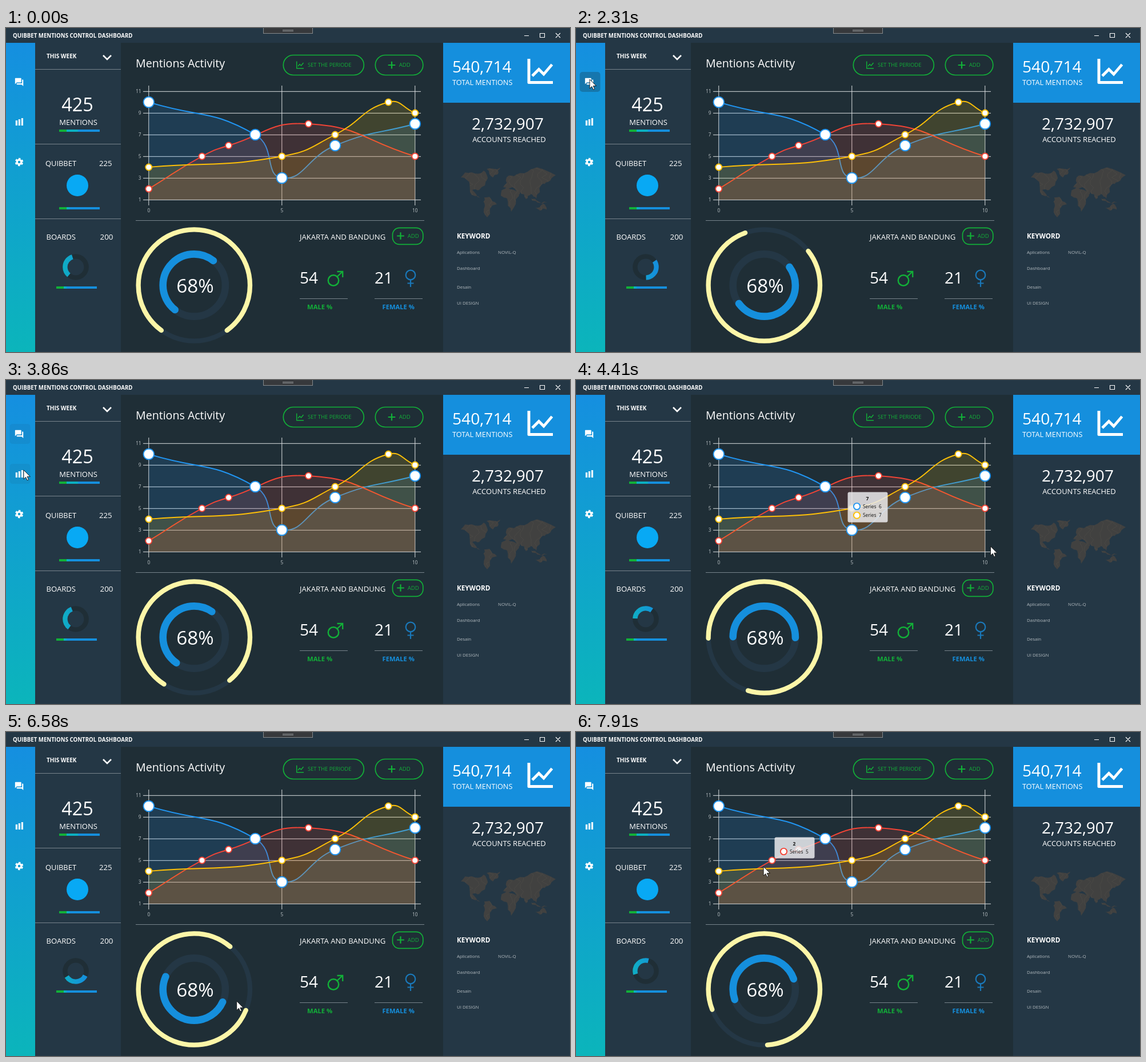
An HTML page that plays this animation: 987x568 px, repeating every 7990 ms.

```html
<!DOCTYPE html>
<html lang="en">
<head>
<meta charset="utf-8">
<title>Mentions dashboard</title>
<style>
  html, body { margin: 0; width: 100%; height: 100%; overflow: hidden; background: #1f2e36; }
  svg { display: block; width: 100%; height: 100%; }
  text { font-family: "Open Sans", "Noto Sans", sans-serif; }
</style>
</head>
<body>
<svg id="stage" viewBox="0 0 987 568" fill="none"></svg>
<script>
const LOOP = 7990;
const PANEL = '#243745', DARK = '#1f2e36', BLUE = '#158fdd', GREEN = '#12b038', TEAL = '#0bb0c0', RULE = '#77838b';

// --- markup helpers ---
const rect = (x, y, w, h, fill, more = '') =>
  `<rect x="${x}" y="${y}" width="${w}" height="${h}" fill="${fill}" ${more}/>`;
const circle = (x, y, r, more = '') => `<circle cx="${x}" cy="${y}" r="${r}" ${more}/>`;
const line = (d, color, width = 1, more = '') =>
  `<path d="${d}" stroke="${color}" stroke-width="${width}" ${more}/>`;
const shape = (d, fill, more = '') => `<path d="${d}" fill="${fill}" ${more}/>`;
const text = (x, y, size, str, fill = '#fff', more = '') =>
  `<text x="${x}" y="${y}" font-size="${size}" fill="${fill}" ${more}>${str}</text>`;
const BOLD = ' font-weight="700"', MID = ' text-anchor="middle"', END = ' text-anchor="end"';

// --- chart ---
const px = v => 249.8 + v * 46.6;
const py = v => 320 - v * 19;

const series = [
  { color: '#2196f3', r: 9.3, data: [[0, 10], [4, 7], [5, 3], [7, 6], [10, 8]] },
  { color: '#f34436', r: 5.5, data: [[0, 2], [2, 5], [3, 6], [6, 8], [10, 5]] },
  { color: '#fec007', r: 5.5, data: [[0, 4], [5, 5], [7, 7], [9, 10], [10, 9]] }
];

// Smoothed line: control points follow the neighbours, weighted by segment length.
function smoothPath(pts) {
  const mid = (a, b) => [(a[0] + b[0]) / 2, (a[1] + b[1]) / 2];
  const len = (a, b) => Math.hypot(b[0] - a[0], b[1] - a[1]);
  let d = 'M' + pts[0];
  for (let i = 0; i < pts.length - 1; i++) {
    const p1 = pts[i], p2 = pts[i + 1], p0 = pts[i - 1] || p1, p3 = pts[i + 2] || p2;
    const c1 = mid(p0, p1), c2 = mid(p1, p2), c3 = mid(p2, p3), l2 = len(p1, p2);
    const k1 = len(p0, p1) / (len(p0, p1) + l2), k2 = l2 / (l2 + len(p2, p3));
    const ctrl = (p, from, to, k) => p.map((v, j) => v + c2[j] - from[j] - (to[j] - from[j]) * k);
    d += `C${ctrl(p1, c1, c2, k1)} ${ctrl(p2, c2, c3, k2)} ${p2}`;
  }
  return d;
}

function chart() {
  let grid = '', curves = '', dots = '';
  for (let v = 1; v <= 11; v += 2) {
    grid += line(`M240 ${py(v) + .3}H726`, '#dde1e3') + text(236.5, py(v) + 3.2, 8.2, v, '#c3cacd', END);
  }
  for (let v = 0; v <= 10; v += 5) {
    grid += line(`M${px(v)} 101V311`, '#dde1e3') + text(px(v), 322.5, 8.2, v, '#c3cacd', MID);
  }
  for (const { color, r, data } of series) {
    const pts = data.map(([x, y]) => [px(x), py(y)]);
    const d = smoothPath(pts);
    curves += shape(`${d}V${py(1)}H${px(0)}Z`, color, 'fill-opacity=".15"') + line(d, color, 1.9);
    for (const [x, y] of pts) dots += circle(x, y, r, `fill="#fff" stroke="${color}" stroke-width="1.9"`);
  }
  return grid + curves + dots;
}

// --- world map: rough outlines with seeded coastlines ---
let seed = 7;
const random = () => (seed = seed * 16807 % 2147483647) / 2147483647;

function roughen(pts) {
  return pts.flatMap((a, i) => {
    const b = pts[(i + 1) % pts.length], k = (random() - .5) * .45;
    return [a, [(a[0] + b[0]) / 2 - (b[1] - a[1]) * k, (a[1] + b[1]) / 2 + (b[0] - a[0]) * k]];
  });
}

function worldMap() {
  const lands = [
    '796,262 815,253 836,250 843,264 828,284 816,284 830,298 812,288 806,266',
    '841,247 865,245 861,256 852,262',
    '837,297 846,296 859,309 842,332 838,312',
    '867,285 876,280 898,294 884,322 877,299 866,294',
    '870,279 876,262 893,257 918,248 962,258 948,270 937,275 928,299 919,291 910,300 899,287 895,295 886,279',
    '919,299 928,302 947,306 930,306',
    '926,315 940,308 946,318 934,320'
  ];
  const coast = lands.map(s => {
    const pts = s.split(' ').map(p => p.split(',').map(Number));
    return `M${roughen(roughen(pts)).join('L')}Z`;
  }).join('');
  let borders = '';
  for (let x = 804; x < 962; x += 12) {
    borders += `M${x} 244`;
    for (let y = 250; y < 334; y += 6) borders += `L${x + random() * 14} ${y}`;
  }
  return `<clipPath id="land"><path d="${coast}"/></clipPath>` +
    shape(coast, '#414140') + line(borders, '#504d49', .6, 'clip-path="url(#land)"');
}

// --- small parts ---
const split = (x, y, teal) => rect(x, y, 71, 4, BLUE) + rect(x, y, teal, 4, TEAL) + rect(x, y, 13, 4, GREEN);
const pill = (x, y, w, h, r) =>
  `<rect x="${x}" y="${y}" width="${w}" height="${h}" rx="${r}" stroke="${GREEN}" stroke-width="1.7"/>`;
const plus = (x, y, r) => line(`M${x - r} ${y}H${x + r}M${x} ${y - r}V${y + r}`, GREEN, 2.2);
const ring = (id, x, y, r, width, color, track, sweep, cap) =>
  circle(x, y, r, `stroke="${track}" stroke-width="${width}"`) +
  circle(x, y, r, `id="${id}" stroke="${color}" stroke-width="${width}" pathLength="360"
    stroke-dasharray="${sweep} ${360 - sweep}" stroke-linecap="${cap}"`);

const gear = circle(23, 235, 3.8, 'stroke="#fff" stroke-width="3.2"') +
  circle(23, 235, 6, 'stroke="#fff" stroke-width="2.4" stroke-dasharray="3.4 2.883" stroke-dashoffset="-1.44"');
const chat = shape('M17 12V3A1 1 0 0 0 16 2H3A1 1 0 0 0 2 3V17L6 13H16A1 1 0 0 0 17 12M21 6H19V15H6V17A1 1 0 0 0 7 18H18L22 22V7A1 1 0 0 0 21 6Z',
  '#fff', 'transform="translate(14.4 86.2) scale(.72)"');
const bars = [9, 11, 13].map((h, i) => rect(16.8 + i * 5, 171 - h, 3.2, h, '#fff')).join('');

const menu = [0, 1, 2].map(i => ({ id: 'menu' + i, x: 6.5, y: 77 + i * 70, w: 36, h: 35 }));
const addButton = { x: 676.5, y: 350.3, w: 53.3, h: 29 };

function tip(id, title, rows) {
  let s = rect(-.5, -.5, 70, 21 + rows.length * 16, '#ececee', 'rx="3" fill-opacity=".85"') +
    text(34, 14, 8.5, title, '#111', BOLD + MID);
  rows.forEach(([color, value], i) => {
    const y = 24.5 + i * 15.7;
    s += circle(15.5, y, 5.6, `fill="#fff" stroke="${color}" stroke-width="1.9"`) +
      text(26, y + 3.2, 8.4, 'Series', '#111') + text(54, y + 3.2, 8.4, value, '#111');
  });
  return `<g id="${id}">${s}</g>`;
}

// --- scene ---
const titleBar =
  rect(0, 0, 987, 26, PANEL) +
  text(12, 16.6, 9.7, 'QUIBBET MENTIONS CONTROL DASHBOARD', '#fff', BOLD) +
  rect(450.5, -1, 86, 10.5, '#37393c', 'stroke="#85898c"') +
  line('M484 3.5H503M484 5.5H503', '#8b8e90') +
  line('M907 13.5H915M935 9.5H942.5V16.5H934.5V9.5ZM962 9L970 17M970 9L962 17', '#fff', 1.1);

const sidebar =
  rect(0, 26, 51, 542, 'url(#side)') +
  menu.map(m => rect(m.x, m.y, m.w, m.h, '#1c3340', `id="${m.id}" rx="5"`)).join('') +
  chat + bars + gear;

const leftPanel =
  rect(51, 26, 150, 542, PANEL) +
  line('M51 72.5H201M51 203.5H201M51 334.5H201', RULE) +
  text(71, 53.4, 10, 'THIS WEEK', '#fff', BOLD) + line('M170 48L177 55 184 48', '#fff', 2.6) +
  text(125, 146, 32.5, '425', '#fff', MID) + text(126.5, 169.6, 13, 'MENTIONS', '#fff', MID) + split(93, 178, 33) +
  text(69, 241.5, 12.9, 'QUIBBET') + text(185.5, 241.5, 13.2, '225', '#fff', END) +
  circle(125, 276, 19, 'fill="#08a9f4"') + split(93, 314, 18) +
  text(70.5, 371, 13.1, 'BOARDS') + text(187.5, 371, 13.4, '200', '#fff', END) +
  ring('small', 122, 419, 18.6, 8.4, 'url(#arc)', DARK, 122, 'butt') + split(88, 453, 18);

const center =
  text(227, 69, 19.6, 'Mentions Activity') +
  pill(485.3, 47.5, 141, 35, 17.5) + pill(646.3, 47.5, 83.5, 35, 17.5) +
  pill(addButton.x, addButton.y, addButton.w, addButton.h, 12) +
  line('M508.7 58.5V70.7H521M511 67L514 63.5 516.5 66 520.5 61', GREEN, 1.5) +
  text(528, 68.4, 9.4, 'SET THE PERIODE', GREEN) +
  plus(675, 65, 6.3) + text(687.7, 68.4, 9.6, 'ADD', GREEN) +
  plus(690.5, 364.5, 6.3) + text(702.7, 368.2, 9.6, 'ADD', GREEN) +
  chart() +
  line('M227 337.5H732', RULE) +
  ring('outer', 329.3, 451, 97.7, 8.3, '#fdf6a8', PANEL, 288, 'round') +
  ring('inner', 329.3, 451, 54.6, 12.6, BLUE, PANEL, 180, 'round') +
  text(331, 464, 33.3, '68%', '#fff', MID) +
  text(514, 371, 13.1, 'JAKARTA AND BANDUNG') +
  text(514, 448, 28, '54') + text(645, 448, 28, '21') +
  circle(573, 442.5, 9.2, 'stroke="#12b038" stroke-width="2.5"') +
  line('M579.5 436L589 427M579.5 427H589.2V437', GREEN, 2.3) +
  circle(708, 433, 8.3, 'stroke="#1a78b9" stroke-width="2.2"') +
  line('M708 441V454M702.5 447.5H713.5', '#1a78b9', 2.2) +
  line('M514 474.5H598M645 474.5H729', RULE) +
  text(527, 493, 11.3, 'MALE %', GREEN, BOLD) + text(658.5, 493, 11.2, 'FEMALE %', BLUE, BOLD);

const keyword = (x, y, str) => text(x, y, 7.9, str, '#b4bcc1');

const rightPanel =
  rect(765, 26, 222, 542, PANEL) + rect(765, 26, 222, 105, BLUE) +
  text(781, 78.3, 28.2, '540,714') + text(781, 100.4, 12.7, 'TOTAL MENTIONS') +
  line('M915 54V95.5H957', '#fff', 5, 'stroke-linejoin="round"') +
  line('M921 84L932.5 72.5 941 81 955.5 64', '#fff', 4.8) +
  text(878, 178, 28, '2,732,907', '#fff', MID) + text(880.5, 199.7, 13, 'ACCOUNTS REACHED', '#fff', MID) +
  worldMap() +
  text(789, 369, 11.7, 'KEYWORD', '#fff', BOLD) +
  keyword(789, 396, 'Aplications') + keyword(861, 396, 'NOVIL-Q') + keyword(789, 424, 'Dashboard') +
  keyword(789, 457, 'Desain') + keyword(789, 485, 'UI DESIGN');

const overlay =
  circle(703.5, 361.5, 6.5, 'id="ripple" fill="#17232a"') +
  tip('tipSeven', 7, [[series[0].color, 6], [series[2].color, 7]]) +
  tip('tipTwo', 2, [[series[1].color, 5]]) +
  '<path id="cursor" d="M0 0V16L3.7 12.5 6.2 18 8.6 17 6.2 11.5H11.4Z" fill="#fff" stroke="#111" stroke-width=".9"/>';

const stage = document.getElementById('stage');
stage.innerHTML =
  `<defs>
    <linearGradient id="side" x1="0" y1="0" x2="0" y2="1"><stop stop-color="#158fe0"/><stop offset="1" stop-color="#0bb5bb"/></linearGradient>
    <linearGradient id="arc" gradientUnits="userSpaceOnUse" x1="99" y1="0" x2="140" y2="0"><stop stop-color="#0fafc3"/><stop offset="1" stop-color="#158fdd"/></linearGradient>
  </defs>` + rect(0, 0, 987, 568, DARK) + titleBar + sidebar + leftPanel + center + rightPanel + overlay;

// --- motion ---
const unit = v => Math.max(0, Math.min(1, v));

// The screen refreshes at a steady step, with two longer holds.
const STEP = 77.2;
const refreshTime = n => n * STEP + (n > 17 ? 152 : 0) + (n > 64 ? 102 : 0);

function lastRefresh(clock) {
  let n = 0;
  while (refreshTime(n + 1) <= clock + 10) n++;
  return refreshTime(n);
}

// The rings turn at constant speed but lose some time around each hold.
const lag = t => 428 * unit((t - 1310) / 1000) + 232 * unit((t - 4400) / 1000);
const spin = t => 216 + .104 * (t - lag(t));

// Pointer stops: [time, x, y]
const stops = [[190, 816, 550], [820, 366, 334], [1310, 18, 167], [1540, 18, 167], [2310, 24, 90], [2600, 24, 90],
  [2960, 26, 242], [3240, 26, 242], [3680, 24, 92], [4090, 40, 244], [4400, 730, 292], [5120, 704, 362],
  [6130, 704, 362], [6580, 404, 473], [7500, 338, 232], [7900, 328, 236]];

function pointer(t) {
  const i = Math.max(1, stops.findIndex(s => s[0] >= t));
  const [a, b] = t > stops[stops.length - 1][0] ? stops.slice(-2) : [stops[i - 1], stops[i]];
  const k = Math.min(1, (t - a[0]) / (b[0] - a[0]));
  return [a[1] + (b[1] - a[1]) * k, a[2] + (b[2] - a[2]) * k];
}

// Highlight fades with the share of recent time spent over a button.
function hover(t, { x, y, w, h }) {
  let hits = 0;
  for (let k = 0; k < 4; k++) {
    const [cx, cy] = pointer(t - k * 50);
    if (cx > x && cx < x + w && cy > y && cy < y + h) hits++;
  }
  return hits / 4;
}

const el = Object.fromEntries([...stage.querySelectorAll('[id]')].map(n => [n.id, n]));
const set = (id, name, value) => el[id].setAttribute(name, value);
const move = (id, x, y) => set(id, 'transform', `translate(${x.toFixed(1)} ${y.toFixed(1)})`);
const show = (id, on) => set(id, 'display', on ? 'inline' : 'none');
const turn = (id, angle) => set(id, 'stroke-dashoffset', (90 - angle % 360).toFixed(2));

function draw(now) {
  const t = lastRefresh(now % LOOP);
  const [cx, cy] = pointer(t);

  turn('outer', spin(t));
  turn('inner', spin(t) + 2);
  turn('small', spin(t) + 4);

  show('cursor', t > 150);
  move('cursor', cx, cy);

  for (const m of menu) set(m.id, 'opacity', .3 * hover(t, m));
  set('ripple', 'opacity', .95 * hover(t, addButton));

  const glide = unit((4660 - t) / 262);
  show('tipSeven', t > 4300 && t < 5700);
  move('tipSeven', 503 - 27 * glide, 192 + 5 * glide);
  show('tipTwo', Math.hypot(cx - px(2), cy - py(5)) < 30);
  move('tipTwo', 348, 185);
}

const begin = performance.now();
function loop() {
  draw(performance.now() - begin);
  requestAnimationFrame(loop);
}
loop();
</script>
</body>
</html>
```
